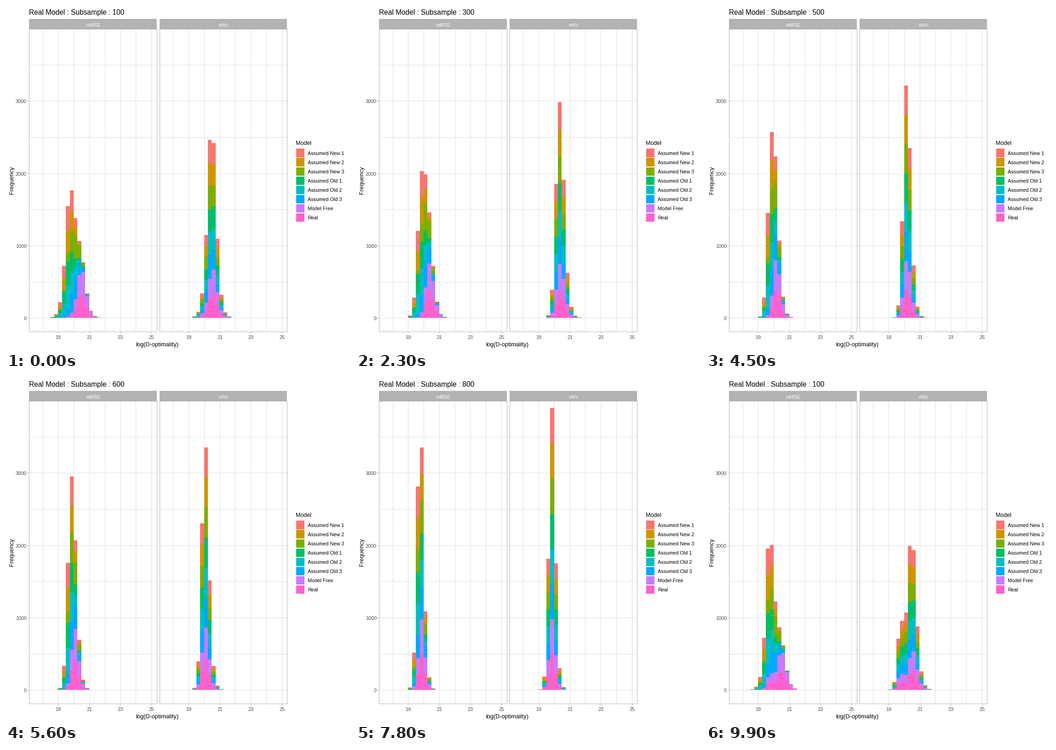
Write a matplotlib script that moves like this. It is 748x748 px and loops after 10000 ms.

```python
import numpy as np
import matplotlib.pyplot as plt
from matplotlib.animation import FuncAnimation
from matplotlib.collections import PolyCollection
from matplotlib.patches import Rectangle

SIZE, DPI = 748, 100
PX = 72 / DPI
plt.rcParams["font.family"] = "Liberation Sans"

MODELS = {
    "Assumed New 1": "#F8766D", "Assumed New 2": "#CD9600",
    "Assumed New 3": "#7CAE00", "Assumed Old 1": "#00BE67",
    "Assumed Old 2": "#00BFC4", "Assumed Old 3": "#00A9FF",
    "Model Free": "#C77CFF", "Real": "#FF61CC",
}
COLORS = list(MODELS.values())[::-1]    # stacked from the bottom up
FAMILY = [2, 2, 1, 0, 0, 1, 0, 0]       # models that behave alike

# Medians of the three model families at a few subsample sizes (hundreds)
KEY_SIZES = [1, 2, 4, 9]
MEDIANS = {
    "mMSE": [(19.71, 19.845, 19.85, 19.705),
             (20.05, 20.165, 20.10, 19.74),
             (20.52, 20.51, 20.315, 19.77)],
    "mVc": [(20.485, 20.47, 20.295, 19.765),
            (20.45, 20.455, 20.285, 19.76),
            (20.56, 20.53, 20.33, 19.78)],
}
DRAWS = 1000                            # per model

EDGES = 18.25 + .25 * np.arange(18)
BINS = len(EDGES) - 1
LEFTS = {"mMSE": 50.2, "mVc": 333.8}
PANEL_W, TOP, BOTTOM = 277.5, 50, 708
X19, UNIT, BIN_UNIT = 63.2, 33.75, 33.64
ZERO, PER = 678.3, .1573

N_STATES, N_FRAMES = 9, 100
ARRIVE = np.round(np.arange(N_STATES + 1) * 11.12 + .3).astype(int)
ARRIVE[[0, -1]] = 0, N_FRAMES


def cdf(x, median, size):
    """Logistic curve, narrower for larger samples, with a short left tail."""
    d = x - median
    left = np.minimum(d, 0)
    logit = (5.7 + .04 * size ** 2) * d - 5 * (1 - 1 / size) * left ** 2
    return 1 / (1 + np.exp(-logit))


def stack(name, size):
    """Stack levels, models + 1 by bins."""
    medians = [np.interp(size, KEY_SIZES, m) for m in MEDIANS[name]]
    counts = [DRAWS * np.diff(cdf(EDGES, medians[f], size)) for f in FAMILY]
    return np.vstack([np.zeros(BINS), np.cumsum(counts, axis=0)])


STATES = np.array([[stack(name, size) for name in LEFTS]
                   for size in range(1, N_STATES + 1)])


def pose(frame):
    """Current state, next state and linear progress between them."""
    i = np.searchsorted(ARRIVE, frame, side="right") - 1
    steps = 6 if i < 2 else 5
    t = max(0, 1 - (ARRIVE[i + 1] - frame) / steps)
    return i, (i + 1) % N_STATES, t


def px(v):
    return int(np.floor(v + .5))


def row(count):
    return px(ZERO - count * PER)


def bar_verts(levels):
    verts = []
    for left, panel in zip(LEFTS.values(), levels):
        x = np.round(left + X19 + (EDGES - 19) * BIN_UNIT)
        y = np.round(ZERO - panel * PER)
        for low, high in zip(y[:-1], y[1:]):
            for x0, x1, a, b in zip(x[:-1], x[1:], low, high):
                verts.append([(x0, a), (x1, a), (x1, b), (x0, b)])
    return verts


fig = plt.figure(figsize=(SIZE / DPI, SIZE / DPI), dpi=DPI, facecolor="white")
ax = fig.add_axes([0, 0, 1, 1])
ax.set(xlim=(0, SIZE), ylim=(SIZE, 0))
ax.axis("off")


def text(x, y, s, size, color="black", **kw):
    return ax.text(x, y, s, fontsize=size * PX, color=color, **kw)


def box(x0, y0, x1, y1, color, z=1):
    ax.add_patch(Rectangle((x0, y0), x1 - x0, y1 - y0, fc=color, lw=0,
                           antialiased=False, zorder=z))


GRID, EDGE, TICK = "#DEDEDE", "#B3B3B3", "#4D4D4D"

for name, start in LEFTS.items():
    left, right = px(start), px(start + PANEL_W)
    for count in range(0, 4000, 500):
        y = row(count)
        box(left, y, right, y + 1, GRID)
    for v in range(18, 26):
        x = px(start + X19 + (v - 19) * UNIT)
        box(x, TOP, x + 1, BOTTOM, GRID)
        if v % 2:
            box(x, BOTTOM, x + 1, BOTTOM + 4, EDGE)
            text(x + .5, 724, str(v), 10.9, TICK, ha="center")
    for y in (TOP, BOTTOM):
        box(left, y, right + 1, y + 1, EDGE, 3)
    for x in (left, right):
        box(x, TOP, x + 1, BOTTOM + 1, EDGE, 3)
    box(left, 28, right, TOP, EDGE)
    text(start + PANEL_W / 2, 45, name, 10.7, "white", ha="center")

for count in range(0, 4000, 1000):
    y = row(count)
    box(47, y, 50, y + 1, EDGE)
    text(45, y + 5, str(count), 10.9, TICK, ha="right")

title = text(50, 19, "", 15.5)
text(329, 740, "log(D-optimality)", 12.8, ha="center")
text(13.5, 379, "Frequency", 12.8, rotation=90, ha="center", va="center")
text(630, 302, "Model", 12.5)
for i, (name, color) in enumerate(MODELS.items()):
    mid = 319.6 + 20.05 * i
    box(631, px(mid - 9.2), 649, px(mid + 9.2), color)
    text(656, px(mid + 4.2), name, 10.9)

bars = PolyCollection(bar_verts(STATES[0]), linewidths=0, antialiaseds=False,
                      facecolors=np.repeat(COLORS, BINS).tolist() * 2, zorder=2)
ax.add_collection(bars, autolim=False)


def update(frame):
    i, j, t = pose(frame)
    bars.set_verts(bar_verts(STATES[i] * (1 - t) + STATES[j] * t))
    nearest = i if t < .5 else j
    title.set_text(f"Real Model : Subsample : {100 * (nearest + 1)}")
    return bars, title


# Arrivals fall 11 frames apart, the second one a frame later
ARRIVE[:] = [11 * k + (k > 1) for k in range(N_STATES + 1)]
anim = FuncAnimation(fig, update, frames=N_FRAMES, interval=100, repeat=True,
                     repeat_delay=0, blit=False)
plt.show()
```
